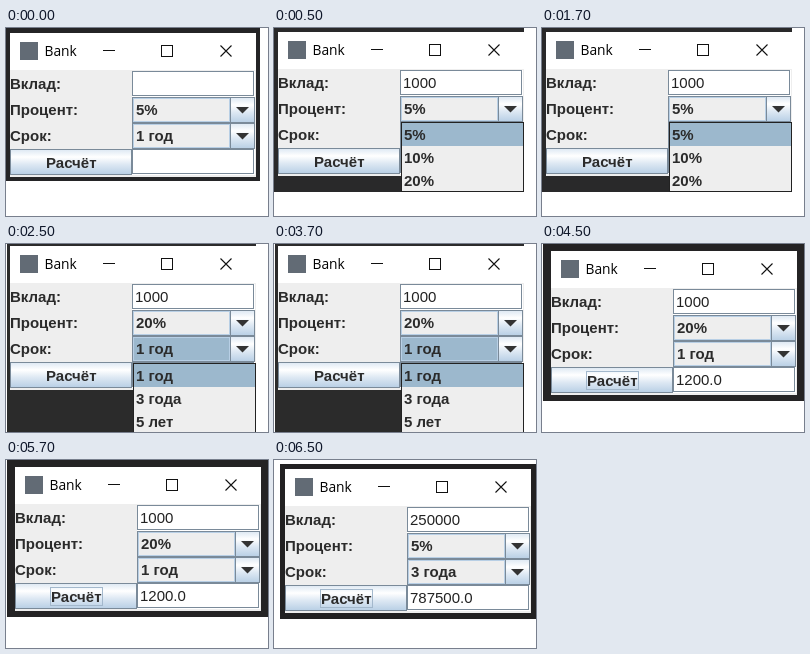
An HTML page that plays this animation: 262 by 188 pixels, repeating every 8000 ms.

```html
<!DOCTYPE html>
<html lang="ru">
<head>
<meta charset="utf-8">
<title>Bank</title>
<style>
  html, body { margin: 0; width: 100%; height: 100%; overflow: hidden; background: #fff; }
  svg { display: block; width: 100vw; height: 100vh; }
  text { font: 15px "Liberation Sans", Arial, sans-serif; fill: #222; white-space: pre; }
  .bold { font-weight: bold; fill: #2b2b2b; }
  .title { font: 13.8px "Open Sans", "Noto Sans", sans-serif; fill: #000; }
</style>
</head>
<body>
<svg id="stage" viewBox="0 0 262 188" xmlns="http://www.w3.org/2000/svg">
  <defs>
    <linearGradient id="metal" x1="0" y1="0" x2="0" y2="1">
      <stop offset="0" stop-color="#dde8f3"/>
      <stop offset=".3" stop-color="#fff"/>
      <stop offset=".6" stop-color="#dde8f3"/>
      <stop offset="1" stop-color="#b8cfe5"/>
    </linearGradient>
  </defs>
  <g id="scene"></g>
</svg>
<script>
const LOOP = 8000;
const EDGE = '#7a8a99', PANEL = '#eeeeee', PICKED = '#9cb8cd';
const RATES = ['5%', '10%', '20%'];
const TERMS = ['1 год', '3 года', '5 лет'];
const ROW = 26, COLUMN = 126;
const rowTop = i => 43 + ROW * i;

// back: dark desktop area [x, y, width, height]; x, y: shift of the window
const STATES = [
  { at: 0, back: [0, 0, 254, 153], dark: '#242426', x: 0, y: 0,
    sum: '', rate: 0, term: 0, result: '' },
  { at: 500, back: [0, 0, 250, 164], dark: '#29292a', x: 0, y: -1,
    sum: '1000', rate: 0, term: 0, result: '', popup: { top: 95, items: RATES } },
  { at: 2500, back: [1, 0, 249, 188], dark: '#2b2b2b', x: 0, y: -3,
    sum: '1000', rate: 2, term: 0, result: '', termFocus: true, popup: { top: 122, items: TERMS } },
  { at: 4500, back: [1, 0, 261, 157], dark: '#242324', x: 5, y: 2,
    sum: '1000', rate: 2, term: 0, result: '1200.0', buttonFocus: true },
  { at: 6500, back: [6, 4, 256, 155], dark: '#222122', x: 7, y: 4,
    sum: '250000', rate: 0, term: 1, result: '787500.0', buttonFocus: true }
];

const rect = (x, y, w, h, fill) =>
  `<rect x="${x}" y="${y}" width="${w}" height="${h}" fill="${fill}"/>`;
const box = (x, y, w, h, fill, line = EDGE) =>
  `<rect x="${x + .5}" y="${y + .5}" width="${w - 1}" height="${h - 1}" fill="${fill}" stroke="${line}"/>`;
const text = (x, y, s, cls = 'bold') => `<text x="${x}" y="${y}" class="${cls}">${s}</text>`;

function titleBar() {
  return rect(4, 5, 246, 37, '#fff') +
    rect(14, 14, 18, 18, '#626b75') +
    text(38.5, 28, 'Bank', 'title') +
    rect(97, 22, 12, 1, '#111') +
    box(155, 17, 12, 12, 'none', '#111') +
    '<path d="M214.5 17.5l11 11m0-11l-11 11" stroke="#111" stroke-width="1.1" fill="none"/>';
}

const label = (row, s) => text(4, rowTop(row) + 18, s);

function field(row, value) {
  const y = rowTop(row);
  return rect(COLUMN, y, 123, ROW, '#fff') +
    box(COLUMN, y, 122, ROW - 1, '#fff') +
    text(COLUMN + 3, y + 18, value, 'plain');
}

function combo(row, value, focused) {
  const y = rowTop(row);
  return box(COLUMN, y, 123, ROW, PANEL) +
    box(COLUMN + 1, y + 1, 97, ROW - 2, focused ? PICKED : PANEL, '#b8cfe5') +
    box(224, y, 25, ROW, 'url(#metal)') +
    `<path d="M230 ${y + 10}h13l-6.5 6.5z" fill="#333"/>` +
    text(COLUMN + 4, y + 18, value);
}

function button(focused) {
  const y = rowTop(3);
  return box(4, y, 122, ROW, 'url(#metal)') +
    text(40, y + 19, 'Расчёт') +
    (focused ? box(39, y + 4, 53, 19, 'none', '#a3b8cc') : '');
}

function popup({ top, items }) {
  return box(127, top, 123, 70, PANEL, '#222') +
    rect(128, top + 1, 121, 23, PICKED) +
    items.map((s, i) => text(130, top + 18 + 23 * i, s)).join('');
}

function draw(s) {
  return rect(...s.back, s.dark) +
    `<g transform="translate(${s.x} ${s.y})">` +
    titleBar() +
    rect(4, 42, 246, 107, PANEL) +
    label(0, 'Вклад:') + label(1, 'Процент:') + label(2, 'Срок:') +
    field(0, s.sum) +
    combo(1, RATES[s.rate]) +
    combo(2, TERMS[s.term], s.termFocus) +
    button(s.buttonFocus) +
    field(3, s.result) +
    (s.popup ? popup(s.popup) : '') +
    '</g>';
}

const scene = document.getElementById('scene');
let shown = null;

function update(now) {
  const t = now % LOOP;
  const state = STATES.filter(s => s.at <= t).pop();
  if (state !== shown) {
    scene.innerHTML = draw(state);
    shown = state;
  }
}

const start = performance.now();
function tick() {
  update(performance.now() - start);
  requestAnimationFrame(tick);
}
tick();
</script>
</body>
</html>
```
